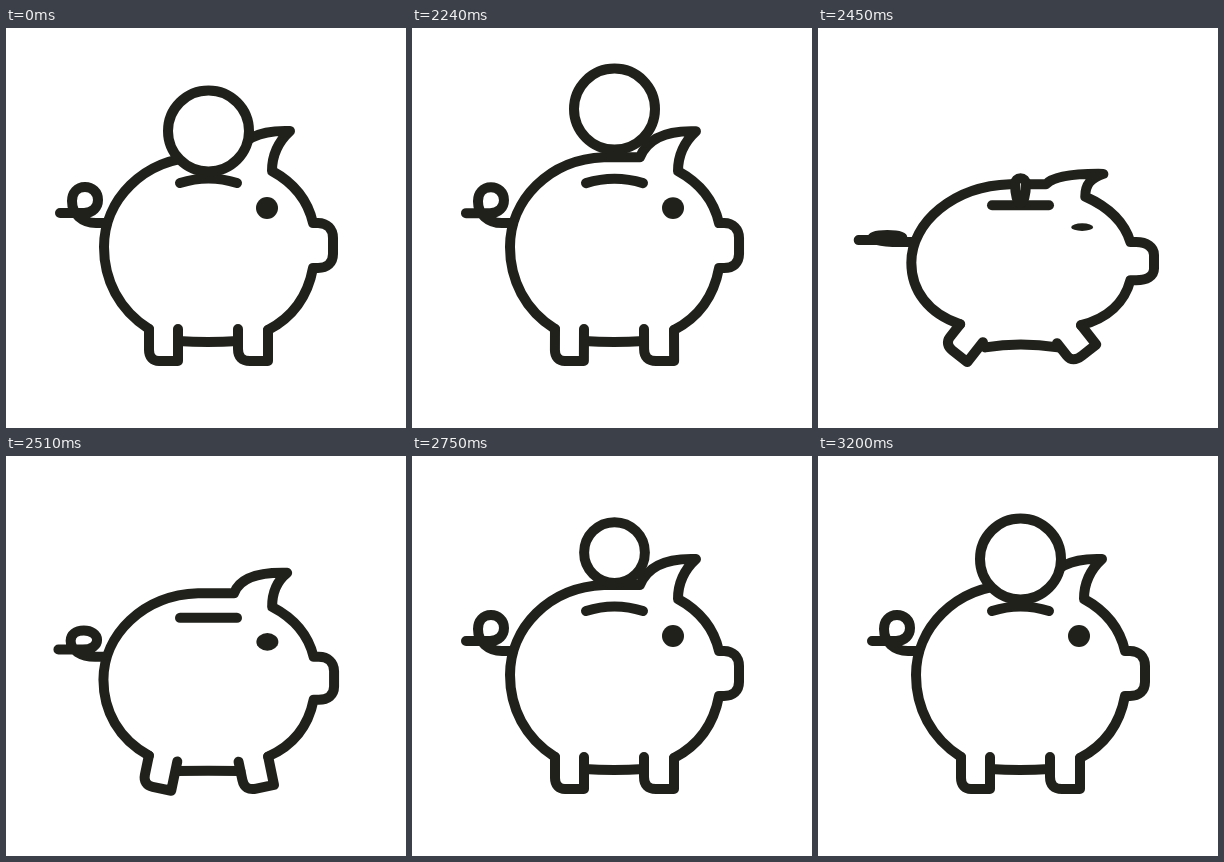
Animation, 400 px wide and 400 px high, one loop 3.29 s. Source, as an HTML page:

```html
<!DOCTYPE html>
<html lang="en">
<head>
<meta charset="utf-8">
<title>Piggy bank</title>
<style>
  html, body { margin: 0; width: 100%; height: 100%; overflow: hidden; background: #fff; }
  svg { display: block; width: 100%; height: 100%; }
  path {
    fill: none; stroke: #21211c; stroke-width: 10; stroke-linecap: round;
    stroke-linejoin: round; vector-effect: non-scaling-stroke;
  }
  #eye { fill: #21211c; }
  #coin { fill: #fff; }
</style>
</head>
<body>
<svg viewBox="0 0 400 400">
  <path id="body"/>
  <path id="belly"/>
  <path id="leftLeg" d="M0,0 V21 C0,28 4,32 10,32 H29 V0"/>
  <path id="rightLeg" d="M0,0 V31 H-18 C-26,31 -30,27 -30,19 V-1"/>
  <path id="tail" d="M-47,-10 H-23 C-14,-10 -9,-16 -9,-23 C-9,-31 -15,-36 -22,-36 C-30,-36 -35,-30 -35,-22 C-35,-9 -25,0 -11,0 H0"/>
  <path id="slot"/>
  <ellipse id="eye"/>
  <path id="coin"/>
</svg>
<script>
const LOOP = 3290, START = 2030, END = 3200, STEP = 30;
const HOP_PEAK = 2150, SWALLOWED = 2500, RETURN = 2660, BOUNCE = 260;
const RADIUS = 40.5, COIN_X = 202.5, COIN_BOTTOM = 143.5;

const bodyShape =
  'M143,301 C113,282 98,252 98,219 C98,172 137,131 192,129 L228,129 ' +
  'C236,109 257,102 284,103 C272,114 266,128 266,143 ' +
  'C288,155 302,173 307,195 L312,195 C321,195 327,201 327,210 ' +
  'L327,226 C327,235 321,240 312,240 L307,240 C302,267 287,289 262,302';

const pulse = (t, peak, width) => Math.exp(-(((t - peak) / width) ** 2));

function set(id, attributes) {
  const node = document.getElementById(id);
  for (const name in attributes) node.setAttribute(name, attributes[name]);
}

function poseAt(t) {
  return {
    squash: 1.85 * pulse(t, 2420, 78),
    spread: 1.7 * pulse(t, 2405, 65),
    lag: 0.27 * pulse(t, 2600, 70)  // ear and tail settle last
  };
}

// Presses a point down, more towards the back, and pushes it outwards.
function warp(x, y, { squash, spread, lag }) {
  const tip = Math.max(0, 129 - y) / 26;
  const press = 20 * (Math.max(0, 300 - y) / 170) ** 0.6 - 3;
  const dx = 13 * ((x - 200) / 146) ** 3 * spread + tip * (14 * spread - 10 * squash);
  const dy = press * squash + tip * (8 * squash + 14 * lag);
  return [x + dx, y + dy];
}

function drawPig(pose) {
  const { squash, spread, lag } = pose;
  set('body', {
    d: bodyShape.replace(/(\d+),(\d+)/g, (_, x, y) => warp(+x, +y, pose).join())
  });

  const drawLeg = (id, x, y, side) => set(id, {
    transform: `translate(${warp(x, y, pose)}) rotate(${24 * squash * side}) scale(1 ${1 - 0.13 * squash})`
  });
  drawLeg('leftLeg', 143, 301, 1);
  drawLeg('rightLeg', 262, 302, -1);

  const bellyY = 313 + 4 * squash;
  set('belly', {
    d: `M${172 - 3 * squash},${bellyY} Q202,${315 - squash} ${232 + 5 * squash},${bellyY}`
  });

  const [tailX, tailY] = warp(101, 195, pose);
  set('tail', {
    transform: `translate(${tailX - 2 * spread} ${tailY}) scale(${1 + 0.14 * spread} ${1 - 0.5 * (squash + lag)})`
  });

  const slotY = 155 + 14 * squash, arch = 9 * Math.max(0, 1 - 2 * squash);
  set('slot', { d: `M174,${slotY} Q${COIN_X},${slotY - arch} 231,${slotY}` });
  set('eye', { cx: 261 + 3 * spread, cy: 180 + 12 * squash, rx: 11, ry: 11 - 4.5 * squash });
  return slotY;
}

function coinAt(t, slotY) {
  if (t < START || t >= END) {
    return { top: COIN_BOTTOM - 2 * RADIUS, bottom: COIN_BOTTOM, half: RADIUS };
  }
  if (t < SWALLOWED) {  // hops, then is sucked into the slot
    const fall = 36 * ((t - HOP_PEAK) / 144) ** 2 - 36;
    const sink = fall > 0 ? fall * fall / 165 : fall;
    return {
      top: COIN_BOTTOM - 2 * RADIUS + sink,
      bottom: Math.min(COIN_BOTTOM + fall, slotY - 2),
      half: RADIUS - 0.4 * Math.max(0, sink)
    };
  }
  // grows back and bounces twice
  const bounces = Math.max(0, (t - RETURN - 10) / BOUNCE);
  const lift = 25 * 0.5 ** bounces * Math.abs(Math.sin(Math.PI * bounces));
  const half = RADIUS * Math.min(1, (t - RETURN) / 120);
  return { top: COIN_BOTTOM - lift - 2 * half, bottom: COIN_BOTTOM - lift, half };
}

function drawCoin({ top, bottom, half }) {
  const middle = top + half, left = COIN_X - half, right = COIN_X + half;
  const visible = half > 1 && bottom > middle;
  set('coin', {
    d: visible
      ? `M${left},${middle} A${half},${half} 0 0 1 ${right},${middle} A${half},${bottom - middle} 0 0 1 ${left},${middle}Z`
      : ''
  });
}

function draw() {
  const now = performance.now() % LOOP;
  const t = now < START ? 0 : START + Math.floor((now - START) / STEP) * STEP;
  const slotY = drawPig(poseAt(t));
  drawCoin(coinAt(t, slotY));
  requestAnimationFrame(draw);
}
draw();
</script>
</body>
</html>
```
